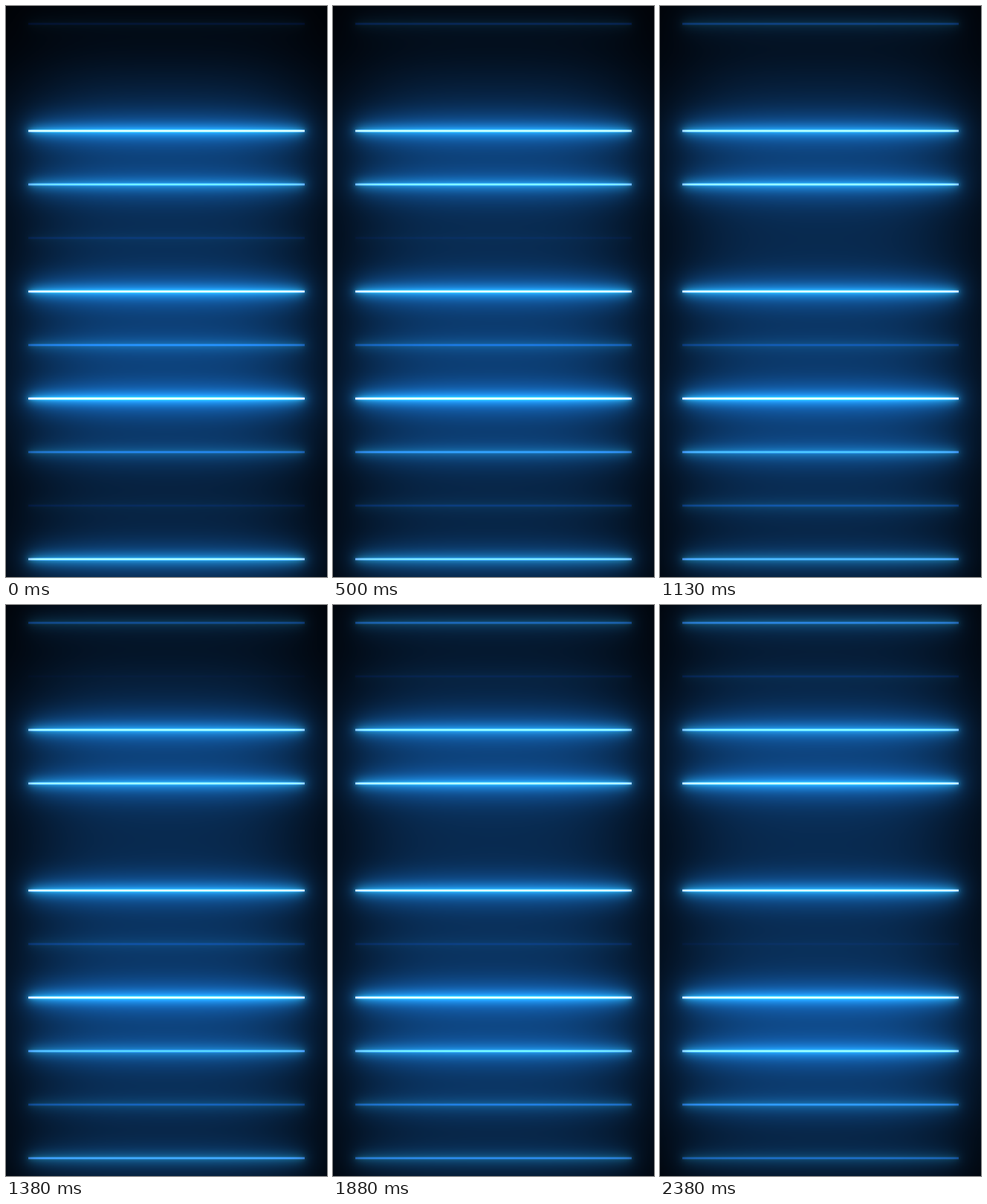
An HTML page with a canvas for the animation above (2510 ms loop, 432 by 768 pixels).

```html
<!DOCTYPE html>
<html lang="en">
<head>
<meta charset="utf-8">
<title>Neon lines</title>
<style>
  html, body { margin: 0; width: 100%; height: 100%; overflow: hidden; background: #000104; }
  canvas { display: block; width: 432px; height: 768px; }
</style>
</head>
<body>
<canvas id="stage" width="432" height="768"></canvas>
<script>
const W = 432, H = 768, LEFT = 30, RIGHT = 402;
const LOOP = 2510, STEP = 125, STEPS = 20;
const BASE = [0, 1, 4];

// Brightness of each tube at the start and end of the loop.
const tubes = [
  [.13, .52], [-.13, .15], [.95, .8], [.74, .92], [.13, -.18], [.96, .94],
  [.45, .06], [1, .95], [.46, .83], [.11, .52], [.87, .43]
].map(([from, to], i) => ({ y: 24 + 72 * i, from, to }));

// Blurred halos: spread and added colour.
const halos = [
  { sigma: 2.5, rgb: [15, 45, 40] },
  { sigma: 7, rgb: [14, 60, 75] },
  { sigma: 18, rgb: [9, 42, 72] },
  { sigma: 65, rgb: [8, 40, 74] }
];

// Approximate normal distribution function.
const cdf = z => .5 + .5 * Math.tanh(.7979 * (z + .0447 * z ** 3));

for (const h of halos) {
  h.across = Float32Array.from({ length: W }, (_, x) =>
    cdf((x + .5 - LEFT) / h.sigma) - cdf((x + .5 - RIGHT) / h.sigma));
}

const ctx = document.getElementById("stage").getContext("2d");
const image = ctx.createImageData(W, H);
const px = image.data;

function draw(phase) {
  const levels = tubes.map(t => Math.max(0, t.from + (t.to - t.from) * phase));
  let p = 0;
  for (let y = 0; y < H; y++) {
    const core = [0, 0, 0];
    const glow = halos.map(() => 0);
    tubes.forEach((t, i) => {
      const d = y + .5 - t.y, level = levels[i];
      halos.forEach((h, k) => {
        glow[k] += level ** 1.3 * Math.exp(-d * d / (2 * h.sigma ** 2));
      });
      const cover = Math.abs(d) < 1 ? 1 : Math.abs(d) < 2 ? .35 : 0;
      core[0] += cover * 220 * level ** 3.5;
      core[1] += cover * 150 * level ** 1.7;
      core[2] += cover * 200 * level;
    });
    for (let x = 0; x < W; x++) {
      const inside = x >= LEFT && x < RIGHT ? 1 : 0;
      let r = BASE[0] + core[0] * inside;
      let g = BASE[1] + core[1] * inside;
      let b = BASE[2] + core[2] * inside;
      for (let k = 0; k < halos.length; k++) {
        const { across, rgb } = halos[k], a = across[x] * glow[k];
        r += a * rgb[0];
        g += a * rgb[1];
        b += a * rgb[2];
      }
      px[p++] = r;
      px[p++] = g;
      px[p++] = b;
      px[p++] = 255;
    }
  }
  ctx.putImageData(image, 0, 0);
}

let shown = -1;
const start = performance.now();

function tick() {
  const time = (performance.now() - start) % LOOP;
  const step = Math.min(STEPS - 1, Math.floor(time / STEP));
  if (step !== shown) {
    shown = step;
    draw(step / (STEPS - 1));
  }
  requestAnimationFrame(tick);
}
tick();
</script>
</body>
</html>
```
